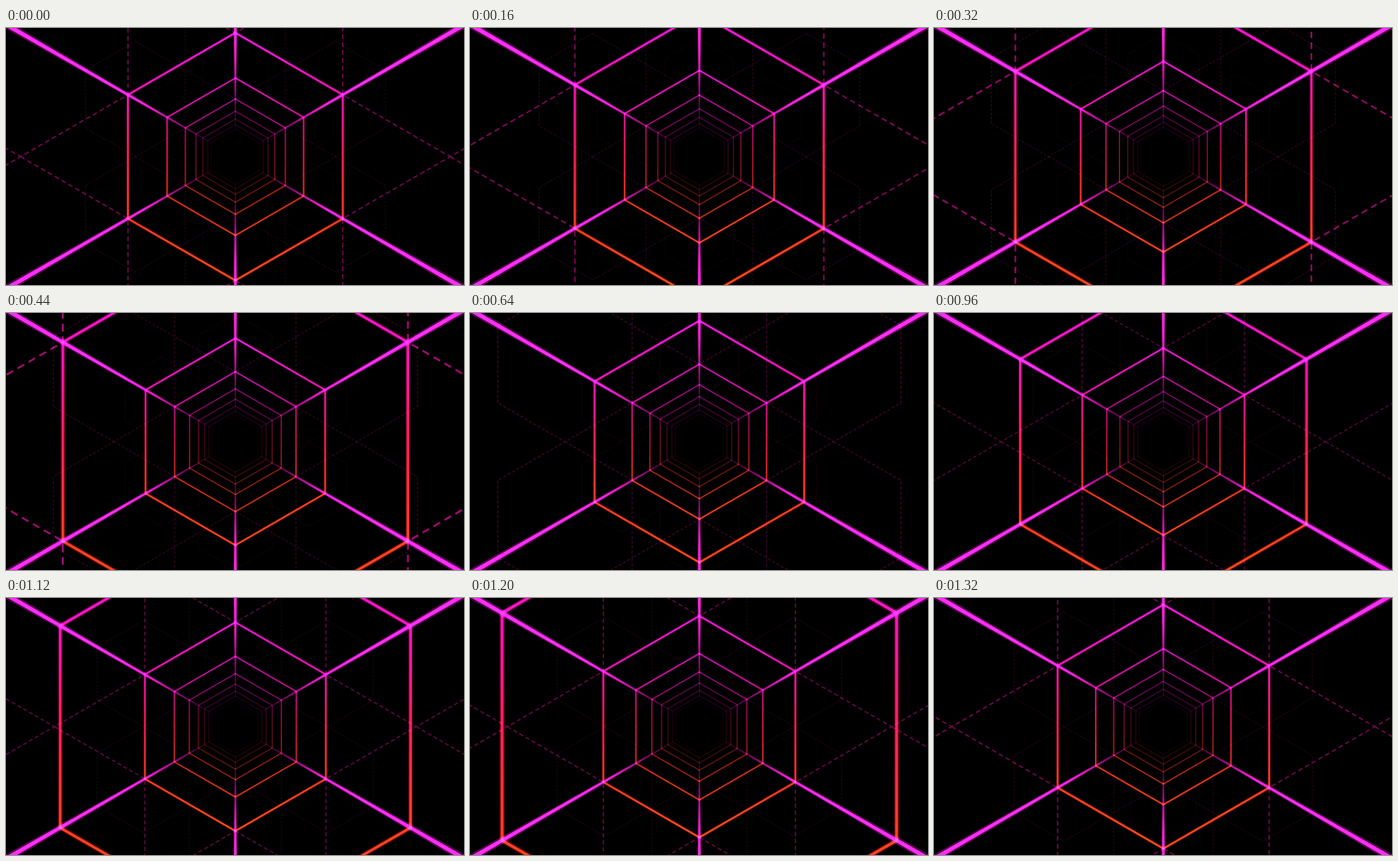
An HTML page with a canvas that plays this animation: 500x281 px, repeating every 1.36 s.

```html
<!DOCTYPE html>
<html lang="en">
<head>
<meta charset="utf-8">
<title>Neon hexagon tunnel</title>
<style>
  html, body { margin: 0; width: 100%; height: 100%; overflow: hidden; background: #000; }
  canvas { display: block; width: 500px; height: 281px; }
</style>
</head>
<body>
<canvas id="stage" width="500" height="281"></canvas>
<script>
const ctx = document.getElementById('stage').getContext('2d');
const W = 500, H = 281, CX = 250.4, CY = 140.7;
const LOOP = 1360, STEP = 40;
const FOCAL = 236;       // ring radius at depth 1
const START = 1.743;     // depth of the first ring at time 0
const SPEED = 0.0598;    // depth travelled per step
const DEPTH = 9;         // everything beyond is dark
const REACH = 290;       // rail length, past the stage corners

const corners = Array.from({ length: 6 }, (_, i) => {
  const a = (i * 60 - 90) * Math.PI / 180;
  return [Math.cos(a), Math.sin(a)];
});

const fog = z => Math.min(1, Math.max(0, (DEPTH - z) / 7) ** 1.6);

function addHex(x, y, r) {
  corners.forEach(([cx, cy], i) => ctx[i ? 'lineTo' : 'moveTo'](x + cx * r, y + cy * r));
  ctx.closePath();
}

function verticalFade(r, colors) {
  const g = ctx.createLinearGradient(0, -r, 0, r);
  colors.forEach((c, i) => g.addColorStop(i / (colors.length - 1), c));
  return g;
}

function strokeWith(style, width, alpha) {
  ctx.strokeStyle = style;
  ctx.lineWidth = width;
  ctx.globalAlpha = alpha;
  ctx.stroke();
}

function drawRing(z) {
  const r = FOCAL / z, a = fog(z);
  const width = Math.max(0.8, 0.4 + 2.4 / z);
  ctx.beginPath();
  addHex(0, 0, r);
  strokeWith(verticalFade(r, ['#e000c8', '#e800a0', '#f00038', '#ff1808', '#ff2400']), width * 2, a * 0.3);
  strokeWith(verticalFade(r, ['#f020d8', '#f818b0', '#ff2858', '#ff4428', '#ff5520']), width, a * 0.85);
}

// Six dashed hexagons, each touching one corner of the ring
function drawNeighbours(z) {
  const r = FOCAL / z;
  ctx.setLineDash([9 / z, 6 / z]);
  ctx.beginPath();
  for (const [x, y] of corners) addHex(x * 2 * r, y * 2 * r, r);
  strokeWith('#f010a8', Math.max(0.9, 0.4 + 1.8 / z), 0.72 / z ** 0.75 * fog(z));
  ctx.setLineDash([]);
}

const railFill = ctx.createRadialGradient(0, 0, 0, 0, 0, REACH);
for (const r of [27, 32, 40, 50, 65, 85, 115, 160, REACH]) {
  const a = fog(FOCAL / r) * Math.min(1, 0.3 + r / 170);
  railFill.addColorStop(r / REACH, `rgba(255,${Math.min(40, r / 4)},${Math.min(230, 180 + r / 3)},${a})`);
}

function drawRails() {
  ctx.fillStyle = railFill;
  for (const [spread, alpha] of [[0.015, 0.3], [0.0078, 0.85]]) {
    const half = REACH * spread;
    ctx.globalAlpha = alpha;
    for (const [x, y] of corners) {
      ctx.beginPath();
      ctx.moveTo(-y * 0.3, x * 0.3);
      ctx.lineTo(x * REACH - y * half, y * REACH + x * half);
      ctx.lineTo(x * REACH + y * half, y * REACH - x * half);
      ctx.lineTo(y * 0.3, -x * 0.3);
      ctx.fill();
    }
  }
}

function draw(now) {
  const step = Math.floor((now % LOOP) / STEP + 0.02);
  ctx.setTransform(1, 0, 0, 1, 0, 0);
  ctx.globalCompositeOperation = 'source-over';
  ctx.globalAlpha = 1;
  ctx.fillStyle = '#000';
  ctx.fillRect(0, 0, W, H);
  ctx.translate(CX, CY);
  ctx.globalCompositeOperation = 'lighter';
  for (let k = 0; k < 12; k++) {
    const z = START + k - SPEED * step;
    if (z < 0.2 || z > DEPTH) continue;
    if (k % 2 === 0) drawNeighbours(z);
    drawRing(z);
  }
  drawRails();
}

function tick() {
  draw(performance.now());
  requestAnimationFrame(tick);
}
tick();
</script>
</body>
</html>
```
